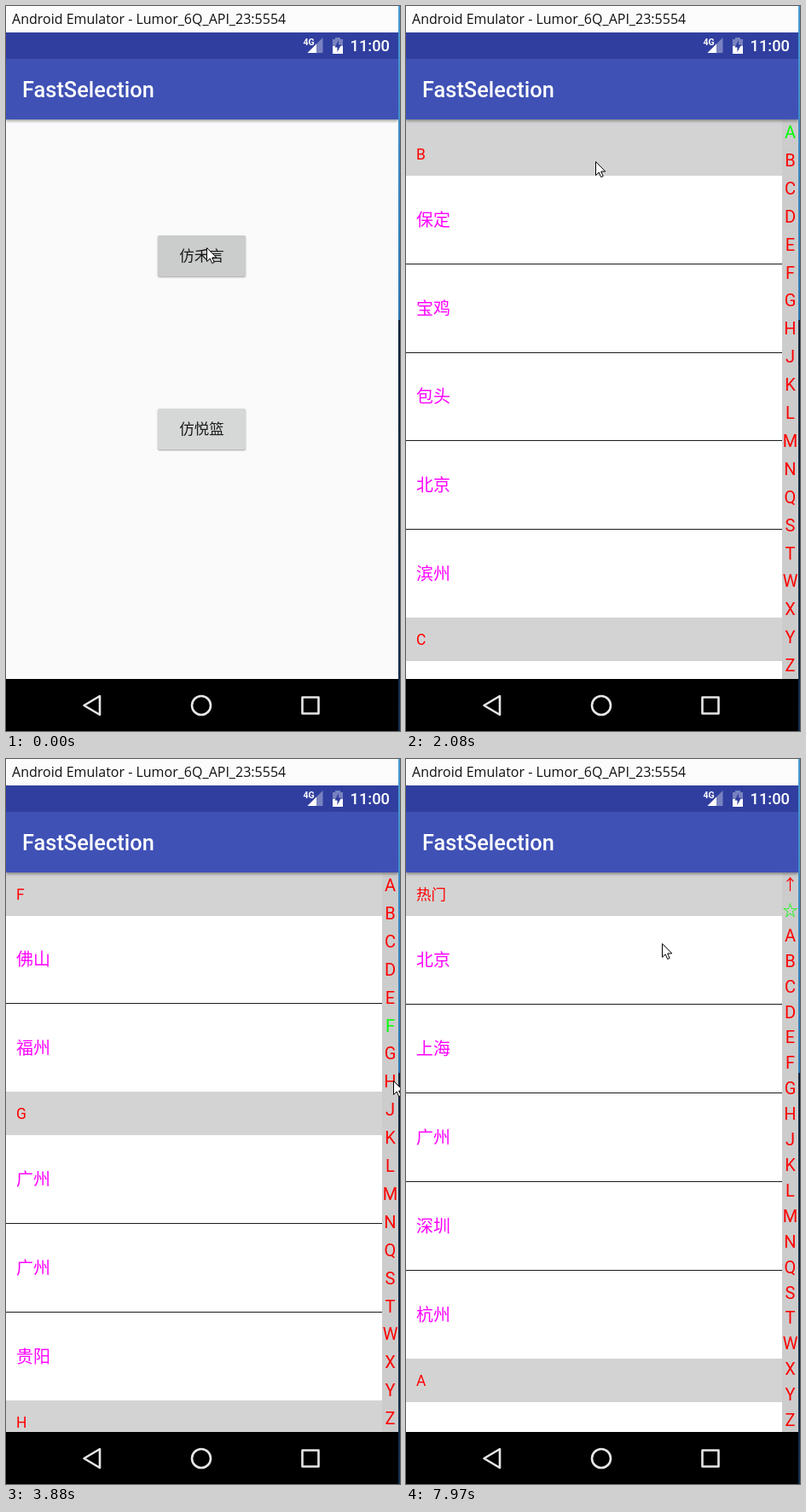
Animation, 462 px wide and 850 px high, one loop 8 s. Source, as an HTML page:

```html
<!DOCTYPE html>
<html lang="zh-CN">
<head>
<meta charset="utf-8">
<title>FastSelection</title>
<style>
html, body { margin: 0; width: 100%; height: 100%; overflow: hidden; background: #000; }
body { position: relative; font-family: Roboto, "Noto Sans CJK SC", "Noto Sans CJK", sans-serif; }
div, svg, span { position: absolute; box-sizing: border-box; }
.caption { left: 0; top: 0; width: 460px; height: 31px; background: #fcfcfc; color: #111;
  font: 16px/30px "Open Sans", "Noto Sans", sans-serif; padding-left: 7px; white-space: nowrap; }
.edge { left: 460px; top: 0; width: 2px; height: 850px;
  background: linear-gradient(#4a9ad4 0, #2a78b4 368px, #0b2238 368px, #14304c 850px); }
.screen { left: 0; top: 0; width: 460px; height: 850px; overflow: hidden; }
.win { left: 0; top: 31px; width: 460px; height: 758px; background: #fafafa; overflow: hidden; isolation: isolate; }
.status { left: 0; top: 0; width: 460px; height: 31px; background: #303f9f; z-index: 3; }
.bar { left: 0; top: 31px; width: 460px; height: 71px; background: #3f51b5; color: #fff; z-index: 2;
  box-shadow: 0 2px 3px rgba(0,0,0,.35); font: 500 25.4px/73px Roboto, sans-serif; padding-left: 19px; }
.icons { left: 0; top: 0; z-index: 1; }
.btn { left: 178px; width: 103px; height: 48px; background: #d6d7d7; border-radius: 2px; overflow: hidden;
  box-shadow: 0 1px 2px rgba(0,0,0,.35); color: #1c1c1c; font-size: 17.5px; line-height: 48px; text-align: center; }
#press { background: #cbcccc; }
#ripple { left: 56px; top: 14px; border-radius: 50%; }
.page { left: 0; top: 102px; width: 460px; height: 656px; background: #fff; }
.list { left: 0; top: 0; width: 441px; height: 656px; overflow: hidden; }
.sec, .row { position: relative; }
.head { position: sticky; top: 0; height: 51px; padding-left: 12px; background: #d3d3d3; color: #f00;
  font-size: 17.5px; line-height: 52px; z-index: 1; }
.row { height: 103.8px; padding-left: 12px; color: #f0f; font-size: 20px; line-height: 105px; }
.row:last-child { height: 102.9px; }
.row:not(:last-child)::after { content: ""; position: absolute; left: 0; top: 102.9px; width: 100%; height: 1px; background: #1a1a1a; }
.index { left: 441px; top: 0; width: 19px; height: 656px; background: #ccc; color: #f00; font-size: 20px; }
.index span { left: -10px; width: 39px; text-align: center; }
.index .on { color: #0f0; }
</style>
</head>
<body>
<div class="screen">
  <div class="win" id="home">
    <div class="status"></div><div class="bar">FastSelection</div>
    <div class="btn" id="press" style="top:238px"><div id="ripple"></div>仿禾言</div>
    <div class="btn" style="top:441px">仿悦篮</div>
  </div>
  <div class="win" id="lists"><div class="status"></div><div class="bar">FastSelection</div></div>
  <svg class="icons" width="460" height="850" viewBox="0 0 460 850" fill="none">
    <g fill="#fff" font-family="Roboto, sans-serif">
      <text x="348.5" y="45.5" font-size="10.5" font-weight="700">4G</text>
      <path d="M371.500 37V55H353.500Z" opacity=".35"/><path d="M364 44.500V55H353.500Z"/>
      <path d="M383 39H386V37H392V39H395V47H383Z" opacity=".35"/>
      <path d="M383 47H395V56H383Z"/>
      <path d="M390 40L385.500 48.500H388.500V54L393 45.500H390Z" fill="#303f9f"/>
      <text x="403.500" y="53" font-size="18.3" font-weight="500">11:00</text>
    </g>
    <g stroke="#e6e6e6" stroke-width="2.6" stroke-linejoin="round">
      <path d="M110 809V831L91.500 820Z"/><circle cx="229" cy="820" r="11"/><rect x="347.500" y="810.500" width="19" height="19"/>
    </g>
  </svg>
</div>
<div class="caption">Android Emulator - Lumor_6Q_API_23:5554</div>
<div class="edge"></div>
<svg id="cursor" width="14" height="21" viewBox="0 0 14 21" style="left:0;top:0;overflow:visible">
  <path id="arrow" d="M.5 .5V16.500L4.200 13L6.700 18.600L9.200 17.500L6.700 12H11.800Z" fill="#fff" stroke="#000"/>
  <path id="resize" d="M.5 5.500L5.500 .5V3.500H17.500V.5L22.500 5.500L17.500 10.500V7.500H5.500V10.500Z" fill="#fff" stroke="#000"/>
</svg>
<script>
const LOOP = 8000, TICK = 90, INDEX_H = 658;
const $ = id => document.getElementById(id);

const cities = "A 鞍山|B 保定 宝鸡 包头 北京 滨州|C 长春 长沙 常州 常州 成都 重庆|D 大连 东莞|E 鄂州|F 佛山 福州|" +
  "G 广州 广州 贵阳|H 哈尔滨 海口 杭州 合肥|J 济南 嘉兴|K 昆明|L 兰州 洛阳|M 绵阳|N 南京 宁波|Q 青岛|" +
  "S 上海 深圳 苏州|T 天津|W 武汉 无锡|X 西安 厦门|Y 烟台 扬州|Z 郑州 珠海 中山 遵义 淄博 湛江";
const extras = "↑ 问禾 沪指 联系|☆ 北京 上海 广州 深圳 杭州|";

function add(parent, cls, text = "", tag = "div") {
  const el = document.createElement(tag);
  el.className = cls;
  el.textContent = text;
  parent.append(el);
  return el;
}

function makePage(data, shift) {
  const page = add($("lists"), "page"), list = add(page, "list"), index = add(page, "index");
  const groups = data.split("|"), cell = INDEX_H / groups.length;
  const secs = groups.map((group, i) => {
    const [key, ...rows] = group.split(" ");
    const sec = add(list, "sec");
    if (key === "↑") sec.style.paddingTop = "1px";
    else add(sec, "head", key === "☆" ? "热门" : key);
    rows.forEach(r => add(sec, "row", r));
    const mark = add(index, "", key, "span");
    mark.style.cssText = `top:${i * cell + shift}px;line-height:${cell}px`;
    if (key === "↑" || key === "☆") mark.style.fontSize = "18px";
    return { key, sec, mark };
  });
  const tops = secs.map(s => s.sec.offsetTop);
  return {
    page,
    top: key => tops[secs.findIndex(s => s.key === key)],
    show(y) {
      list.scrollTop = y;
      const active = tops.filter(v => v <= y + 0.5).length - 1;
      secs.forEach((s, i) => s.mark.classList.toggle("on", i === active));
    }
  };
}

const plain = makePage(cities, -1), full = makePage(extras + cities, 0);

// Progress of a move that advances once per tick
const step = (t, start, n) => Math.max(0, Math.min(1, (Math.floor((t - start) / TICK) + 1) / n));
const mix = (a, b, p) => a + (b - a) * p;
const easeOut = (p, k = 2) => 1 - (1 - p) ** k;

// Pointer legs: start, steps, end point, downward bend
const home = [235, 283];
const legs = [
  [180, 9, 163, 320], [1000, 3, 183, 295], [1540, 3, 187, 320], [1900, 3, 222, 182],
  [2350, 8, 450, 324], [3070, 4, 453, 313], [3610, 4, 454, 377], [4070, 2, 444, 359],
  [4530, 3, 443, 384], [4990, 9, 445, 169], [5800, 4, 445, 151], [6530, 3, 445, 168],
  [6890, 3, 447, 179], [7250, 9, 300, 216, 180]
];

function pointer(t) {
  let [x, y] = home;
  for (const [start, n, toX, toY, bend = 0] of legs) {
    const p = step(t, start, n);
    x = mix(x, toX, p);
    y = mix(y, toY, p) + bend * Math.sin(Math.PI * p);
  }
  return [x, y];
}

// Drag, fling, then a jump from the index
function plainScroll(t) {
  const drag = 139.4, rest = plain.top("D") - 480.5;
  if (t >= 3340) return plain.top("F") + 1;
  return mix(drag * step(t, 1900, 3), rest, easeOut(step(t, 2170, 10), 2.2));
}

function draw(t) {
  $("ripple").style.boxShadow = `0 0 0 ${step(t, 180, 5) * 65}px rgba(0,0,0,.12)`;

  const open = step(t, 540, 4);
  $("lists").style.opacity = Math.min(1, open * 1.6);
  $("lists").style.transform = `translateY(${60 * (1 - easeOut(open))}px)`;

  const second = t >= 4530;
  plain.page.style.visibility = second ? "hidden" : "visible";
  full.page.style.visibility = second ? "visible" : "hidden";
  if (second) full.show(full.top(t < 6250 ? "G" : t < 6890 ? "↑" : "☆"));
  else plain.show(plainScroll(t));

  const [x, y] = pointer(t), sizing = t >= 2980 && t < 3160;
  $("cursor").style.transform = `translate(${Math.round(x)}px,${Math.round(y)}px)`;
  $("arrow").style.display = sizing ? "none" : "";
  $("resize").style.display = sizing ? "" : "none";
}

const t0 = performance.now();
function frame() {
  draw((performance.now() - t0) % LOOP);
  requestAnimationFrame(frame);
}
frame();
</script>
</body>
</html>
```
